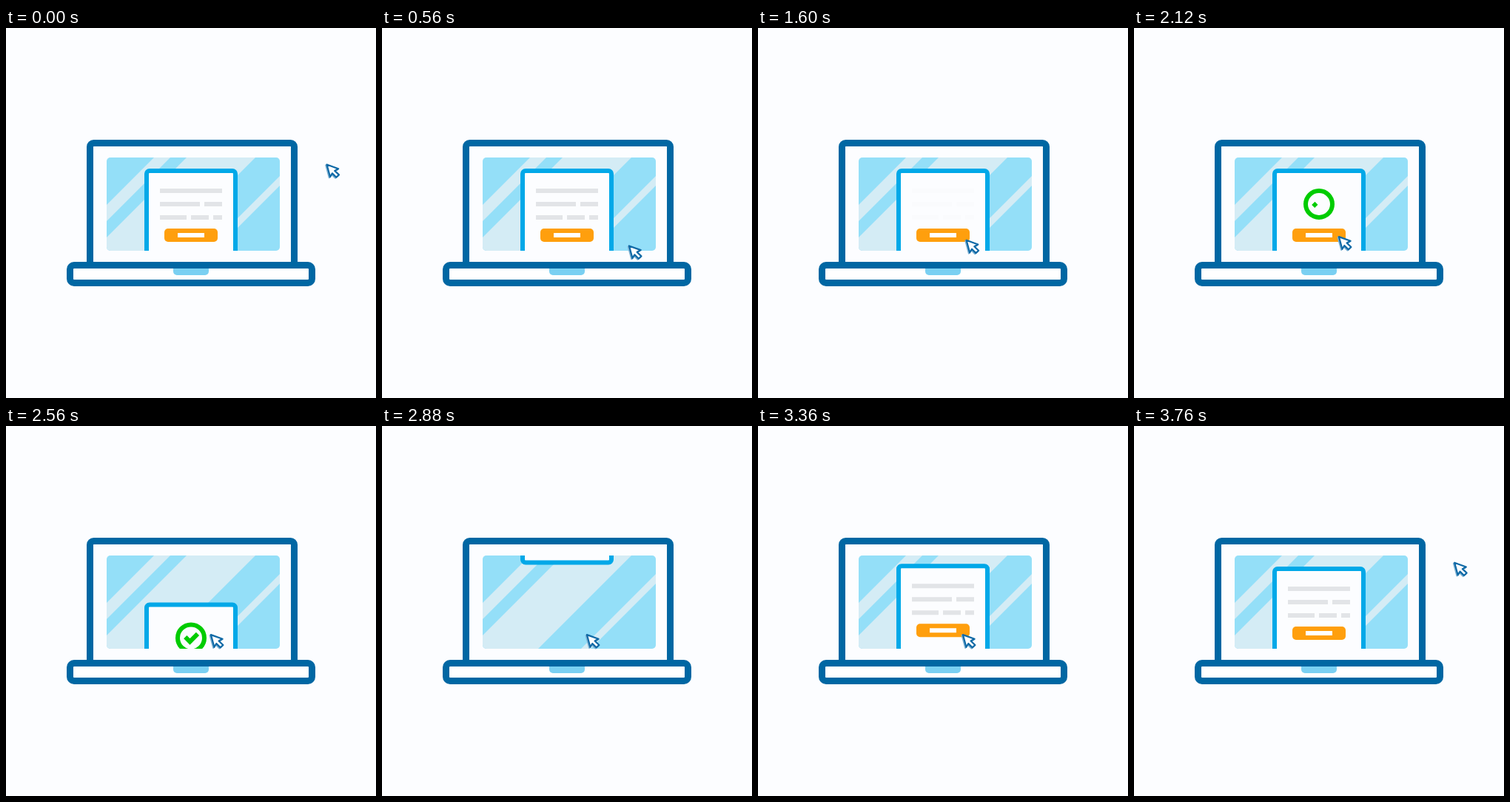
Recreate the animation shown at these times as an HTML page. Size 500 px wide and 500 px high, loop 3.8 s.

```html
<!DOCTYPE html>
<html lang="en">
<head>
<meta charset="utf-8">
<title>Form submit</title>
<style>
  html, body { margin: 0; width: 100%; height: 100%; overflow: hidden; background: #fcfdff; }
  svg { display: block; width: 100vw; height: 100vh; }
</style>
</head>
<body>
<svg viewBox="0 0 500 500">
  <defs>
    <clipPath id="screen"><rect x="136" y="175" width="234" height="126" rx="5"/></clipPath>
    <path id="arrow" d="M2.5 1.5 18.2 7.2 13.2 9.9 19 15.4 15.3 18.8 9.9 13.4 7 18.2Z"/>
  </defs>

  <rect x="113.5" y="155.5" width="276" height="180" rx="5" fill="#fcfdff" stroke="#0067a3" stroke-width="9"/>
  <rect x="86.5" y="320.5" width="327" height="24" rx="5.5" fill="#fff" stroke="#0067a3" stroke-width="9"/>
  <path d="M226 325H274V329a5 5 0 0 1-5 5H231a5 5 0 0 1-5-5Z" fill="#7ad0f2"/>

  <g clip-path="url(#screen)">
    <rect x="136" y="175" width="234" height="126" fill="#94dff8"/>
    <g fill="#d4ecf5">
      <path d="M200 175H222L96 301H74Z"/>
      <path d="M244 175H337L211 301H118Z"/>
      <path d="M395 175H408L282 301H269Z"/>
    </g>
    <g id="panel">
      <rect x="190" y="193" width="120" height="115" rx="4" fill="#fcfdff" stroke="#00a8e8" stroke-width="6"/>
      <path id="lines" stroke="#e2e4e7" stroke-width="6"
        d="M208 220H292M208 238H262M268 238H292M208 256H244M250 256H274M280 256H292"/>
      <rect x="214" y="271" width="72" height="18" rx="5" fill="#ff9f0d"/>
      <rect x="232" y="277" width="36" height="6" fill="#fff"/>
      <g fill="none" stroke="#00cc00" stroke-width="6">
        <path id="ring" pathLength="100" d="M250 220a18 18 0 0 1 0 36a18 18 0 0 1 0-36"/>
        <path id="tick" pathLength="100" d="M242.3 236.8 248.5 243 259 232.5"/>
      </g>
    </g>
  </g>

  <g id="cursor" stroke-width="2.2" stroke-linejoin="round">
    <use href="#arrow" x="-1.2" y="1" fill="#7fb2d3" stroke="#7fb2d3"/>
    <use href="#arrow" fill="#fff" stroke="#0f69a6"/>
  </g>
</svg>
<script>
const LOOP = 3800;
const $ = id => document.getElementById(id);
const [panel, lines, ring, tick, cursor] = ['panel', 'lines', 'ring', 'tick', 'cursor'].map($);

const span = (t, a, b) => Math.min(1, Math.max(0, (t - a) / (b - a)));
const smooth = u => (1 - Math.cos(Math.PI * u)) / 2;
const settle = u => 1.32 * u * (1 - u) ** 2 + 3 * u * u * (1 - u) + u ** 3;

// time, x, y
const route = [
  [0, 431, 183], [570, 331.4, 293], [1140, 274.4, 280.6], [1400, 274.4, 280.6],
  [1690, 280.4, 286.6], [2000, 274.4, 280.6], [3470, 274.4, 280.6], [3770, 431, 183], [LOOP, 431, 183]
];

function cursorAt(t) {
  const i = route.findIndex(p => p[0] > t);
  const [a, b] = [route[i - 1], route[i]];
  const u = smooth(span(t, a[0], b[0]));
  return [1, 2].map(k => a[k] + (b[k] - a[k]) * u);
}

function panelY(t) {
  return t < 2800
    ? 125 * (1 - settle(1 - span(t, 2300, 2780)))
    : -136 * (1 - settle(span(t, 2840, 3440)));
}

function trace(path, u) {
  path.style.visibility = u > 0 ? 'visible' : 'hidden';
  path.setAttribute('stroke-dasharray', u < 1 ? `${u * 100} 200` : 'none');
}

function draw(t) {
  const fresh = t >= 2800;
  panel.setAttribute('transform', `translate(0 ${panelY(t)})`);
  lines.setAttribute('opacity', fresh ? 1 : 1 - span(t, 1200, 1620));
  trace(ring, fresh ? 0 : smooth(span(t, 1620, 2080)));
  trace(tick, fresh ? 0 : span(t, 2070, 2280));
  cursor.setAttribute('transform', `translate(${cursorAt(t)})`);
}

const start = performance.now();
function tickFrame() {
  draw((performance.now() - start) % LOOP);
  requestAnimationFrame(tickFrame);
}
tickFrame();
</script>
</body>
</html>
```
